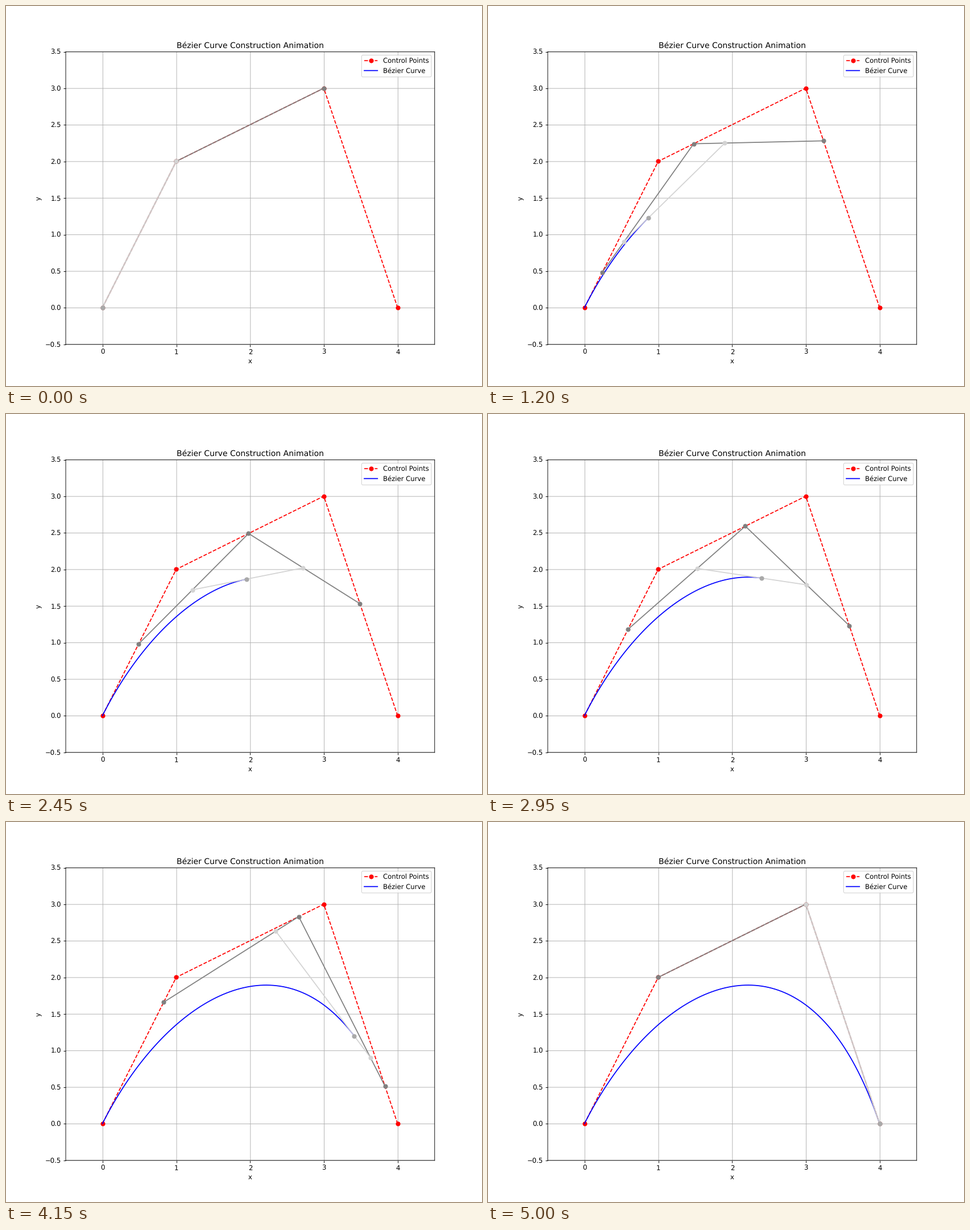
These frames come from a looping animation (837x669 px, 5050 ms). A matplotlib script:

```python
import numpy as np
import matplotlib.pyplot as plt
from matplotlib.animation import FuncAnimation
from matplotlib.transforms import ScaledTranslation

WIDTH, HEIGHT, DPI = 837, 669, 83.7
FRAMES, INTERVAL = 101, 50
HALF = 0.42  # half a device pixel, in stage pixels

plt.rcParams.update({"path.snap": False, "text.hinting": "none"})

control = np.array([[0, 0], [1, 2], [3, 3], [4, 0]], dtype=float)


def reduce_once(points, t):
    """One de Casteljau step: blend each pair of neighbours."""
    return (1 - t) * points[:-1] + t * points[1:]


def bezier(t):
    t = np.asarray(t)[:, None]
    p0, p1, p2, p3 = control
    s = 1 - t
    return s**3 * p0 + 3 * s**2 * t * p1 + 3 * s * t**2 * p2 + t**3 * p3


def shift(dx, dy):
    return ScaledTranslation(dx / DPI, dy / DPI, fig.dpi_scale_trans)


# The tiny margin keeps the pixel size from rounding down.
fig = plt.figure(
    figsize=((WIDTH + 0.01) / DPI, (HEIGHT + 0.01) / DPI), dpi=DPI)

# The frame and grid sit on pixel centres, the data on the exact position.
ax = fig.add_axes([0.125 + HALF / WIDTH, 0.11 - HALF / HEIGHT, 0.775, 0.77])
data = ax.transData + shift(-0.3, HALF)

ax.plot(*control.T, "ro--", label="Control Points", transform=data)
curve, = ax.plot([], [], "b-", label="Bézier Curve", transform=data)
levels = [ax.plot([], [], "o-", color=c, transform=data)[0]
          for c in ("gray", "lightgray", "darkgray")]

ax.set_xlim(-0.5, 4.5)
ax.set_ylim(-0.5, 3.5)
ax.set_xticks(range(5))
ax.set_yticks(np.arange(-0.5, 3.6, 0.5))
ax.set_xlabel("x")
ax.set_ylabel("y")
ax.set_title("Bézier Curve Construction Animation")
ax.grid(True)
for line in ax.get_xgridlines():
    line.set_transform(line.get_transform() + shift(HALF, 0))
ax.legend(loc="upper right").get_frame().set_snap(False)


def update(frame):
    steps = np.arange(frame + 1) / (FRAMES - 1)
    curve.set_data(*bezier(steps).T)
    points = control
    for line in levels:
        points = reduce_once(points, steps[-1])
        line.set_data(*points.T)
    return [curve, *levels]


anim = FuncAnimation(fig, update, frames=FRAMES, interval=INTERVAL,
                     init_func=lambda: update(0), repeat=True,
                     repeat_delay=0, blit=False)
plt.show()
```
